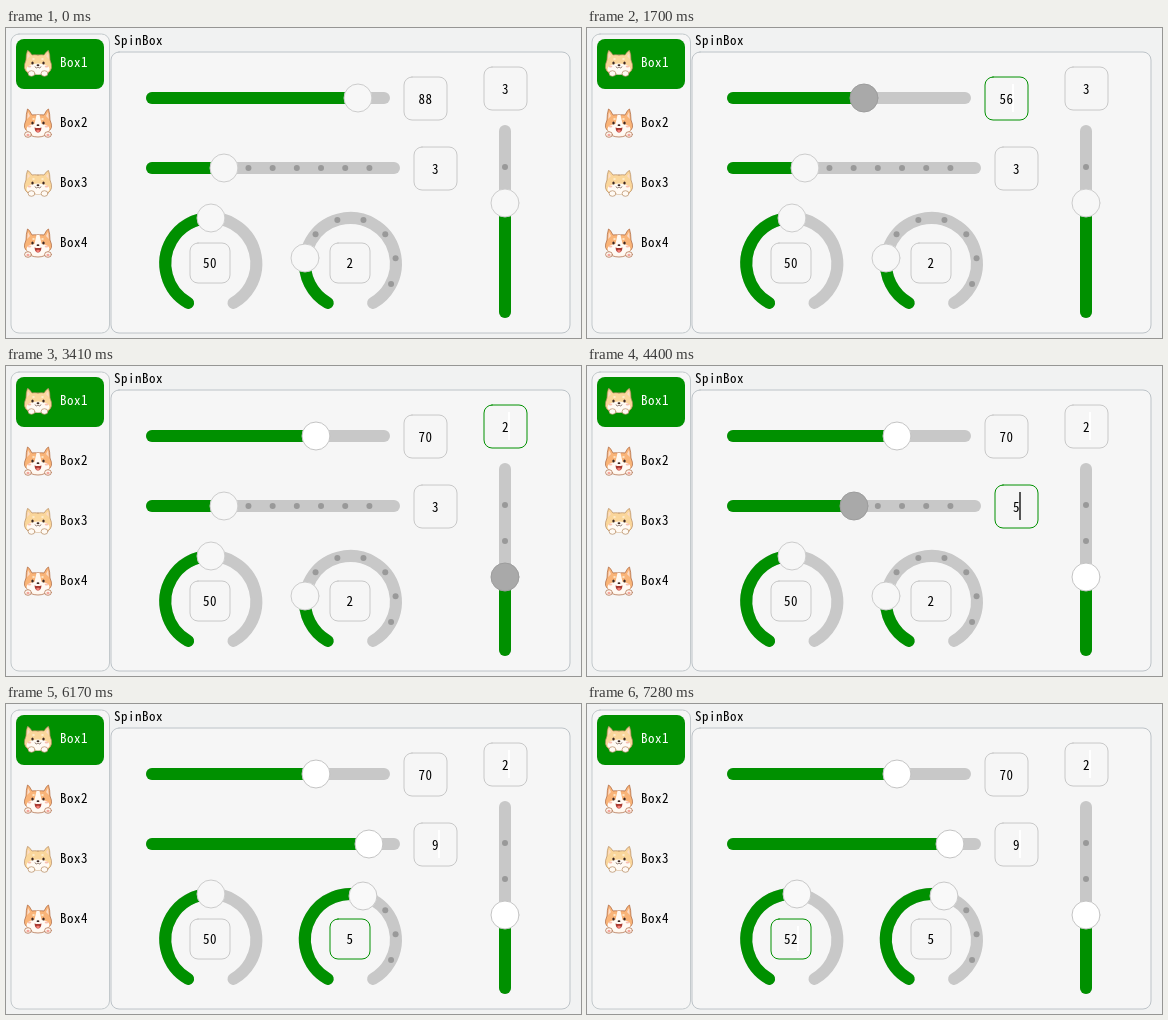
An HTML page with a canvas for the animation above (8 s loop, 575x310 px).

```html
<!DOCTYPE html>
<html lang="en">
<head>
<meta charset="utf-8">
<title>SpinBox</title>
<style>
html, body { margin: 0; width: 100%; height: 100%; overflow: hidden; background: #f1f2f2; }
canvas { display: block; }
</style>
</head>
<body>
<canvas id="stage" width="575" height="310"></canvas>
<script>
const ctx = document.getElementById('stage').getContext('2d');
const LOOP = 8000, TICK = 30;
const GREEN = '#009000', GREY = '#c8c8c8', EDGE = '#c8c8c8', PANEL = '#f6f6f6';
const KNOB = {
  idle: ['#f7f7f7', '#cccccc'],
  down: ['#a9a9a9', '#9d9d9d'],
  up: ['#ffffff', '#c4c4c4'],
  soft: ['#f9f9f9', '#c8c8c8']
};
const FONT = '13px "Noto Sans Mono CJK SC", "Noto Sans Mono CJK JP", "Noto Sans CJK SC", monospace';

// Each list holds [time, state] pairs; "drag" values are interpolated, the rest jump.
const controls = [
  {
    kind: 'line', x: 140, y: 70, len: 244, from: 146, step: 2.341,
    box: [398, 49, 43], drag: true,
    value: [[0, 88], [470, 88], [650, 71], [830, 47], [950, 36], [1040, 31], [1430, 31],
            [1580, 43], [1700, 56], [1820, 69], [1970, 69], [2000, 70]],
    knob: [[0, 'idle'], [500, 'down'], [2030, 'up']],
    focus: [500, 2660],
    caret: [[0, ''], [1460, '#fff'], [2450, '#555'], [2660, '']]
  },
  {
    kind: 'line', x: 140, y: 140, len: 254, from: 145.7, step: 24.19, ticks: 9,
    box: [408, 119, 43],
    value: [[0, 3], [4340, 4], [4400, 5], [5180, 9]],
    knob: [[0, 'idle'], [4280, 'down'], [4700, 'up'], [5180, 'down'], [5240, 'up']],
    focus: [4280, 5660],
    caret: [[0, ''], [4400, '#555'], [4910, '#fff']]
  },
  {
    kind: 'dial', x: 204.8, y: 235.5, step: 3,
    box: [184, 215, 40], drag: true,
    value: [[0, 50], [6740, 50], [7040, 60], [7280, 52]],
    knob: [[0, 'idle'], [6740, 'down'], [7280, 'soft']],
    focus: [6740, LOOP],
    caret: [[0, ''], [6740, '#fff']]
  },
  {
    kind: 'dial', x: 344.4, y: 235.5, step: 100 / 3, ticks: 8,
    box: [324, 215, 40],
    value: [[0, 2], [5750, 3], [5900, 4], [5990, 5]],
    knob: [[0, 'idle'], [5660, 'down'], [6170, 'soft']],
    focus: [5660, 6740],
    caret: [[0, ''], [6470, '#555'], [6740, '']]
  },
  {
    kind: 'column', x: 499, y: 97, len: 193, from: 283.3, step: -36.1, ticks: 4,
    box: [478, 39, 43],
    value: [[0, 3], [2720, 4], [3170, 3], [3380, 2]],
    knob: [[0, 'idle'], [2660, 'down'], [3650, 'up']],
    focus: [2660, 4280],
    caret: [[0, ''], [3350, '#fff'], [4130, '#555'], [4280, '#fff']]
  }
];

const held = (list, t) => list.filter(k => k[0] <= t).pop()[1];

function dragged(list, t) {
  const i = list.findIndex(k => k[0] > t);
  if (i < 0) return list[list.length - 1][1];
  const [t0, a] = list[i - 1], [t1, b] = list[i];
  return Math.round(a + (b - a) * (t - t0) / (t1 - t0));
}

function panel(x, y, w, h, r, fill, edge) {
  ctx.beginPath();
  ctx.roundRect(x, y, w, h, r);
  ctx.fillStyle = fill;
  ctx.fill();
  if (!edge) return;
  ctx.lineWidth = 1;
  ctx.strokeStyle = edge;
  ctx.stroke();
}

function text(s, x, y, color = '#000', align = 'left') {
  ctx.font = FONT;
  ctx.letterSpacing = '0.5px';
  ctx.textAlign = align;
  ctx.fillStyle = color;
  ctx.fillText(s, x, y);
}

function blob(x, y, rx, ry, fill, edge) {
  ctx.beginPath();
  ctx.ellipse(x, y, rx, ry, 0, 0, Math.PI * 2);
  ctx.fillStyle = fill;
  ctx.fill();
  if (!edge) return;
  ctx.strokeStyle = edge;
  ctx.stroke();
}

function shape(d, fill, edge) {
  const p = new Path2D(d);
  if (fill) { ctx.fillStyle = fill; ctx.fill(p); }
  if (edge) { ctx.strokeStyle = edge; ctx.stroke(p); }
}

function pup(y, happy) {
  const coat = happy ? '#f9b478' : '#fad69b', line = happy ? '#a9643d' : '#b58a62';
  ctx.save();
  ctx.translate(32, y);
  ctx.lineWidth = .7;
  const tip = happy ? -14 : -12.5, chin = happy ? 8 : 10;
  if (happy) blob(0, 9, 10, 5, '#fff7ee', line);
  shape(`M0 -8 Q4 -8.5 6 -8 Q9 ${tip} 10.5 ${tip} Q12 -9 12 -3 Q16 6 10 ${chin} Q0 ${chin + 3} -10 ${chin}
    Q-16 6 -12 -3 Q-12 -9 -10.5 ${tip} Q-9 ${tip} -6 -8 Q-4 -8.5 0 -8 Z`, coat, line);
  blob(0, 6, 11.5, 5.5, '#fffaf4');
  if (happy) shape('M-1.5 -8 H1.5 L4 3 H-4 Z', '#fffaf4');
  for (const s of [-1, 1]) {
    shape(`M${s * 8} -7 L${s * 10} ${tip + 3} L${s * 10.8} -4 Z`, '#fbdcc8');
    blob(s * 5.5, 0, 1.2, 1.5, '#3b2723');
    blob(s * 4.5, -4, 1.3, .8, '#fff4dc');
    blob(s * 8.5, 3.5, 1.8, 1.1, '#f9bfae');
    blob(s * (happy ? 10 : 6.5), happy ? 11.5 : 10.5, 3.4, 2.8, '#fffaf4', line);
    if (happy) blob(s * 10, 12, 1.6, 1.2, '#f3a69c');
  }
  blob(0, 2.2, 1.4, .9, '#3b2723');
  if (happy) {
    shape('M-3.5 4.5 Q0 5.5 3.5 4.5 Q3 9.5 0 9.5 Q-3 9.5 -3.5 4.5 Z', '#a83b32');
    blob(0, 8, 1.8, 1.3, '#f27d72');
  } else {
    shape('M-3 4 Q-1.5 6 0 4 Q1.5 6 3 4', null, '#5a3b30');
  }
  ctx.restore();
}

function stroke(color, path) {
  ctx.beginPath();
  path();
  ctx.lineWidth = 12;
  ctx.lineCap = 'round';
  ctx.strokeStyle = color;
  ctx.stroke();
}

function place(c, v) {
  if (c.kind === 'line') return [c.from + c.step * v, c.y];
  if (c.kind === 'column') return [c.x, c.from + c.step * v];
  const a = (v * c.step - 240) * Math.PI / 180;
  return [c.x + 45.5 * Math.cos(a), c.y + 45.5 * Math.sin(a)];
}

function track(c, v) {
  const [kx, ky] = place(c, v);
  if (c.kind === 'dial') {
    const arc = deg => () => ctx.arc(c.x, c.y, 45.5, -Math.PI * 4 / 3, (deg - 240) * Math.PI / 180);
    stroke(GREY, arc(300));
    stroke(GREEN, arc(v * c.step));
    return;
  }
  const seg = (x0, y0, x1, y1) => () => { ctx.moveTo(x0, y0); ctx.lineTo(x1, y1); };
  if (c.kind === 'line') {
    stroke(GREY, seg(c.x + 6, c.y, c.x + c.len - 6, c.y));
    stroke(GREEN, seg(c.x + 6, c.y, kx, c.y));
  } else {
    const end = c.y + c.len - 6;
    stroke(GREY, seg(c.x, c.y + 6, c.x, end));
    stroke(GREEN, seg(c.x, end, c.x, ky));
  }
}

function control(c, t) {
  const v = (c.drag ? dragged : held)(c.value, t);
  track(c, v);
  for (let i = v + 1; i <= (c.ticks || 0); i++) blob(...place(c, i), 3, 3, '#999');
  const [fill, edge] = KNOB[held(c.knob, t)];
  ctx.lineWidth = 1;
  blob(...place(c, v).map(Math.round), 14, 14, fill, edge);

  const [x, y, size] = c.box;
  const active = t >= c.focus[0] && t < c.focus[1];
  panel(x, y, size, size, 8, PANEL, active ? GREEN : EDGE);
  const mid = x + size / 2, label = String(v);
  const caret = held(c.caret, t);
  if (caret) {
    ctx.fillStyle = caret;
    ctx.fillRect(Math.floor(mid + label.length * 3.5 - 1), y + 7, 2, size - 15);
  }
  text(label, mid, y + Math.round(size / 2) + 5, '#000', 'center');
}

function draw(t) {
  ctx.fillStyle = '#f1f2f2';
  ctx.fillRect(0, 0, 575, 310);
  panel(5, 6, 98.5, 299, 8, PANEL, '#c3c9cc');
  panel(105, 24, 459, 281, 8, PANEL, '#bdc3c8');
  text('SpinBox', 108, 17);
  panel(10, 11, 88, 50, 8, GREEN);
  for (let i = 0; i < 4; i++) {
    pup(35 + i * 60, i % 2 === 1);
    text('Box' + (i + 1), 54, 39 + i * 60, i ? '#000' : '#fff');
  }
  controls.forEach(c => control(c, t));
}

function frame() {
  const t = performance.now() % LOOP;
  draw(Math.max(0, Math.floor((t - 20) / TICK) * TICK + 20));
  requestAnimationFrame(frame);
}
frame();
</script>
</body>
</html>
```
